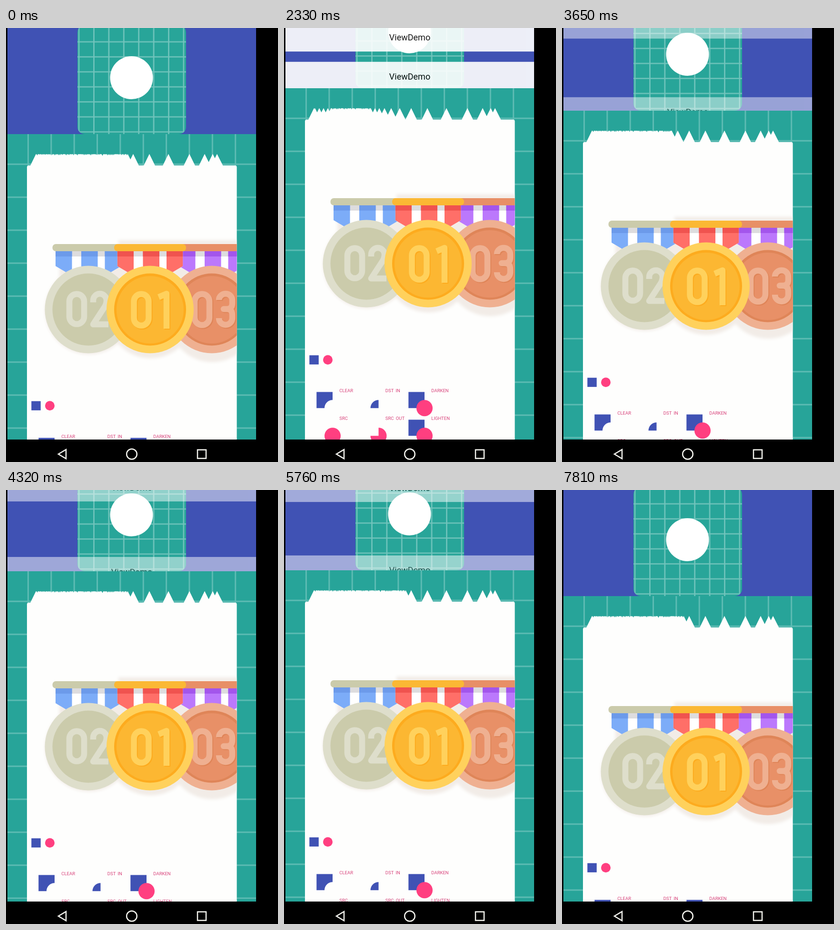
Write an HTML page that moves like this. It is 571 by 908 pixels and loops after 7960 ms.

```html
<!DOCTYPE html>
<html lang="en">
<head>
<meta charset="utf-8">
<title>ViewDemo</title>
<style>
  html, body { margin: 0; width: 100%; height: 100%; overflow: hidden; background: #000; }
  svg { display: block; width: 100vw; height: 100vh; }
  text { font-family: Roboto, sans-serif; }
  .title { font-size: 18px; text-anchor: middle; fill: #000; }
  .label { font-size: 9.5px; word-spacing: 2px; fill: #d8427a; }
  .blue { fill: #4052b4; }
  .pink { fill: #ff3f80; }
  .paper { fill: #fefefd; }
  .digits path { fill: none; stroke-width: 12.5; stroke-linejoin: round; }
  .nav { fill: none; stroke: #f4f4ee; stroke-width: 2.5; }
</style>
</head>
<body>
<svg viewBox="0 0 571 908">
  <defs>
    <clipPath id="screen"><rect x="3" width="522" height="861"/></clipPath>
    <clipPath id="headerClip"><rect id="headerBox" x="3" width="522"/></clipPath>
    <clipPath id="cardClip"><rect x="44" y="288" width="440.5" height="900"/></clipPath>
    <filter id="soft" x="-20%" y="-20%" width="140%" height="140%"><feGaussianBlur stdDeviation="3"/></filter>
    <pattern id="wall" x="45" y="282.5" width="48.35" height="69" patternUnits="userSpaceOnUse">
      <rect width="48.35" height="69" fill="#27a499"/>
      <path d="M0 2.5H48.35M1.5 0V69" stroke="#fff" stroke-opacity=".25" stroke-width="3"/>
    </pattern>
    <pattern id="tile" x="183" y="27.5" width="31.4" height="31.4" patternUnits="userSpaceOnUse">
      <rect width="31.4" height="31.4" fill="#28a599"/>
      <path d="M0 1.5H31.4M1.5 0V31.4" stroke="#fff" stroke-opacity=".34" stroke-width="2.6"/>
    </pattern>
  </defs>

  <g clip-path="url(#screen)">
    <g id="page">
      <rect x="3" y="222" width="522" height="900" fill="url(#wall)"/>
      <rect class="blue" x="3" y="-6" width="522" height="228"/>
      <rect x="150" y="-6" width="228" height="228" rx="15" fill="url(#tile)"/>
      <circle cx="263.5" cy="104" r="45" fill="#fff"/>
      <path id="edge" class="paper"/>
      <rect class="paper" x="44" y="287.5" width="440.5" height="900" rx="4"/>
      <g id="medals" clip-path="url(#cardClip)"></g>
      <rect class="blue" x="53.3" y="780.7" width="19.5" height="19.2"/>
      <circle class="pink" cx="92" cy="790.3" r="10"/>
      <g id="modes"></g>
    </g>
    <g id="topBar">
      <rect x="3" y="-61" width="522" height="61" fill="#fff"/>
      <text class="title" x="264" y="-23.3">ViewDemo</text>
    </g>
    <g clip-path="url(#headerClip)">
      <g id="bottomBar">
        <rect x="3" width="522" height="61" fill="#fff"/>
        <text class="title" x="264" y="37.5">ViewDemo</text>
      </g>
    </g>
  </g>

  <g class="nav">
    <path d="M126 882V901L110 891.5Z"/>
    <circle cx="264" cy="891.5" r="10.8"/>
    <rect x="402" y="882.5" width="18" height="18"/>
  </g>
</svg>

<script>
const LOOP = 7960;
const STEP = 135;           // the screen refreshes about 7.4 times a second
const OPEN = 222;           // header bottom when fully open
const TRAVEL = 106;         // how far the header can collapse
const TEAR_START = 1180;

const $ = id => document.getElementById(id);
const place = (id, y) => $(id).setAttribute('transform', `translate(0 ${y})`);

// Medals are drawn around their own centre.
const zero = (x, top, bottom) => `M${x} ${top}a15.5 15.5 0 0 1 31 0V${bottom}a15.5 15.5 0 0 1-31 0Z`;
const one = 'M18-26L34.5-33V40';
const two = 'M10-15V-19a14 14 0 0 1 28 0q0 8-5 15L10 31H42';
const three = 'M15-20a14 13 0 0 1 28 0V-13q0 12-12 12h-6h6q12 0 12 12V18a14 14 0 0 1-28 0';

function medal(m) {
  const stripe = x => `<rect x="${x}" y="-122" width="34.5" height="44" fill="${m.ribbon}"/>` +
    `<rect x="${x}" y="-122" width="34.5" height="11" fill="${m.fold}"/>`;
  const figures = m.digits.map(d => `<path d="${d}"/>`).join('');
  return `<g transform="translate(${m.x} 589)">
    <clipPath id="band${m.x}"><path d="M-69-122H69V-91L47-78H-47L-69-91Z"/></clipPath>
    <g clip-path="url(#band${m.x})">
      <rect x="-69" y="-122" width="138" height="44" fill="#fff"/>
      <rect x="-69" y="-122" width="138" height="11" fill="#dddcde"/>
      ${[-69, -15, 34.5].map(stripe).join('')}
    </g>
    <rect x="-75.5" y="-137" width="151" height="15" rx="7" fill="${m.bar}"/>
    <circle r="91.5" fill="${m.rim}"/>
    <circle r="75.5" fill="${m.ring}"/>
    <circle cy=".5" r="70.5" fill="${m.face}"/>
    <g class="digits">
      <g stroke="${m.ring}" transform="translate(2 2)">${figures}</g>
      <g stroke="${m.rim}">${figures}</g>
    </g>
  </g>`;
}

const silver = { x: 173, ribbon: '#7cacf8', fold: '#6c9aea', bar: '#cbcbab', rim: '#dedecb',
  ring: '#cbcbab', face: '#cbcbab', digits: [zero(-40, -17, 15), two] };
const bronze = { x: 432, ribbon: '#bb78fc', fold: '#a355ec', bar: '#e88f66', rim: '#efb091',
  ring: '#df8558', face: '#e89067', digits: [zero(-36, -17, 17), three] };
const gold = { x: 302.5, ribbon: '#ff6f68', fold: '#f0534f', bar: '#fbb834', rim: '#ffd15c',
  ring: '#fdab1e', face: '#fcb732', digits: [zero(-34, -17, 18), one] };
const medals = [silver, bronze, gold];

const shadows = medals.map(m => `<circle cx="${m.x + 1}" cy="${580 + m.x / 16}" r="92"/>`).join('');
$('medals').innerHTML = `<g filter="url(#soft)" fill="#f2ece7">
    <rect x="112" y="475" width="390" height="70"/>
    <rect x="236" y="444" width="260" height="10"/>${shadows}
  </g>` + medals.map(medal).join('');

// Blend mode samples: a square and a circle centred on its lower right corner.
const square = '<path class="blue" d="M-33.7-33.7H0V0H-33.7Z"/>';
const disc = '<circle class="pink" r="17"/>';
const samples = [
  ['CLEAR', '<path class="blue" d="M-33.7-33.7H0V-17A17 17 0 0 0-17 0H-33.7Z"/>'],
  ['DST IN', '<path class="blue" d="M0 0H-17A17 17 0 0 1 0-17Z"/>'],
  ['DARKEN', square + disc],
  ['SRC', disc],
  ['SRC OUT', '<path class="pink" d="M0 0V-17A17 17 0 1 1-17 0Z"/>'],
  ['LIGHTEN', square + disc]
];
$('modes').innerHTML = samples.map(([name, art], i) => {
  const x = 102 + 96.5 * (i % 3), y = 891.3 + 58 * Math.floor(i / 3);
  return `<g transform="translate(${x} ${y})">${art}
    <text class="label" x="14.3" y="-33.4">${name}</text></g>`;
}).join('');

// Swipes: header bottom at each turning point, eased in between.
const swipes = [[1180, OPEN], [2200, 126], [2670, 125], [4000, 183], [4900, 137], [5160, 137], [6720, OPEN]];

function headerAt(t) {
  const i = swipes.findIndex(([time]) => time > t);
  if (i < 1) return OPEN;
  const [t0, from] = swipes[i - 1], [t1, to] = swipes[i];
  const ease = (1 - Math.cos(Math.PI * (t - t0) / (t1 - t0))) / 2;
  return Math.round(from + (to - from) * ease);
}

// Torn paper: coarse teeth shrink to the left, fine ones spread out from the middle.
const coarse = [267, 301, 341, 385, 417, 434, 443];
for (let x = 243, gap = 18; x > 63; x -= gap, gap = Math.max(9, gap * .78)) coarse.unshift(x);
coarse.unshift(63);

const fine = [];
for (let x = 63, seed = 7; x < 256;) {
  fine.push(x);
  seed = seed * 16807 % 2147483647;
  x += 1 + 3 * (seed / 2147483647) ** 4;
}

function tornEdge(t) {
  const spread = (t - TEAR_START) * .037;
  const isFine = x => Math.abs(x - 140) < spread && x < 257;
  const peaks = [...coarse.filter(x => !isFine(x)), ...fine.filter(isFine)].sort((a, b) => a - b);
  let d = 'M51 288';
  peaks.forEach((x, i) => {
    const gap = peaks[i + 1] - x;
    d += `L${x} 263.5`;
    if (gap > 24) d += `L${x + 12} 288h${gap - 24}`;
    else if (gap) d += `L${x + gap / 2} ${263.5 + gap}`;
  });
  return d + 'L455.5 288V292H51Z';
}

function draw(t) {
  const bottom = headerAt(t);
  const progress = (OPEN - bottom) / TRAVEL;
  const reveal = 61 * progress;
  place('page', bottom - OPEN);
  place('topBar', reveal - 6);
  place('bottomBar', bottom - reveal);
  $('topBar').setAttribute('opacity', progress);
  $('bottomBar').setAttribute('opacity', progress);
  $('headerBox').setAttribute('height', bottom);
  $('edge').setAttribute('d', tornEdge(t < STEP ? LOOP : t));
}

function frame() {
  const t = performance.now() % LOOP;
  draw(Math.round(t / STEP) * STEP);
  requestAnimationFrame(frame);
}
frame();
</script>
</body>
</html>
```
